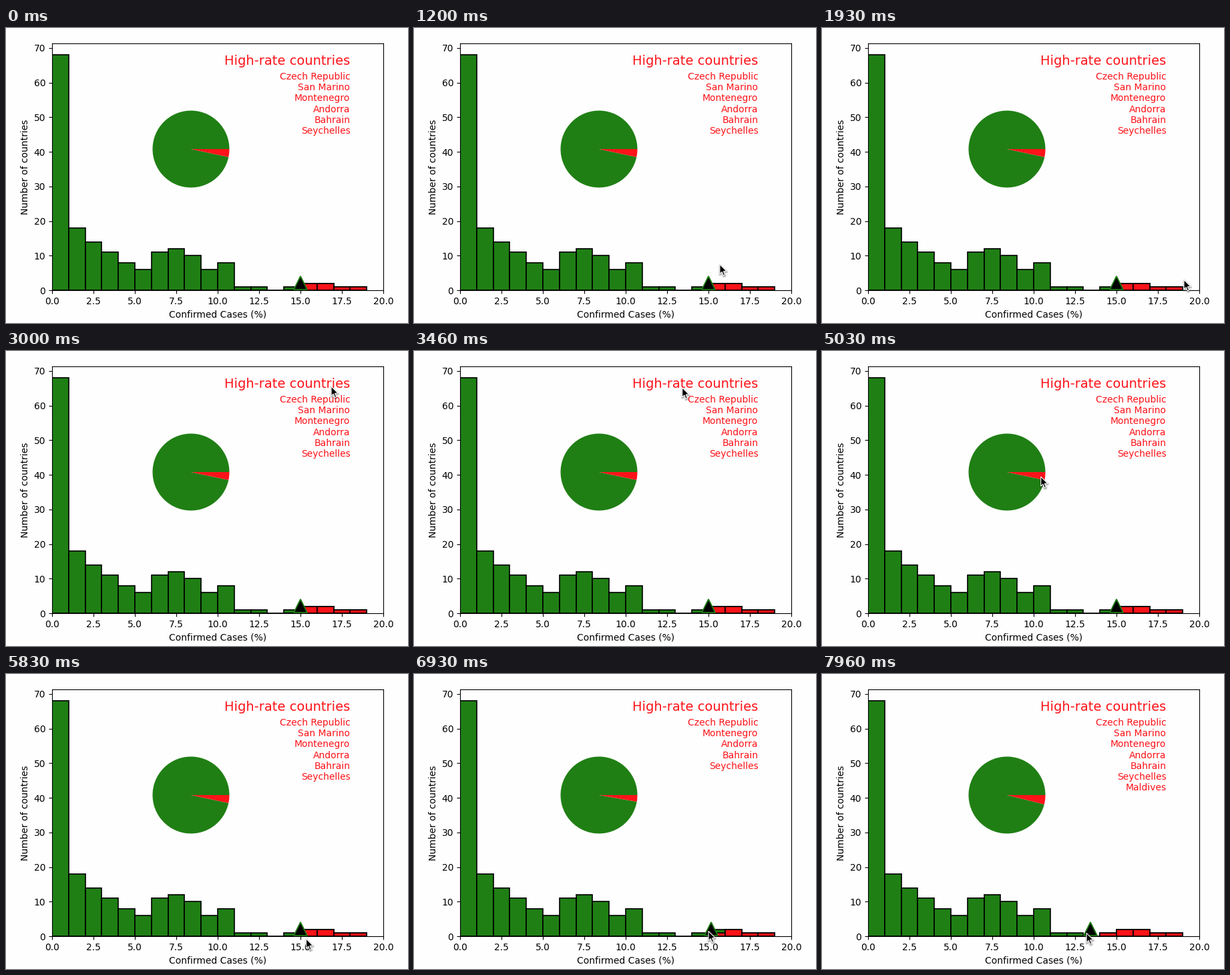
A matplotlib script for the animation above (8000 ms loop, 602 px wide and 441 px high).

```python
import numpy as np
import matplotlib.pyplot as plt
from matplotlib.animation import FuncAnimation
from matplotlib.patches import Polygon, Wedge

W, H, DPI = 602, 441, 100
LOOP, STEP = 8000, 32
PAPER, GREEN, RED = "#fefefe", "#1f7f14", "#fd1319"
LEFT, RIGHT, TOP, BOTTOM = 69, 565, 22.6, 392.2
UNIT = (RIGHT - LEFT) / 20

LOW_COUNTS = [68, 18, 14, 11, 8, 6, 11, 12, 10, 6, 8, 1, 1, 0]
RATES = {
    "Czech Republic": 15.6, "San Marino": 15.08, "Montenegro": 16.3,
    "Andorra": 18.2, "Bahrain": 16.7, "Seychelles": 17.4, "Maldives": 14.4,
}
HIGH_BINS = np.arange(len(LOW_COUNTS), 20)

# Pointer strokes: start ms, end ms, then Bezier points after the last position.
ENTRY = (522, 442)
STROKES = [
    (730, 1530, (540, 290), (386, 357), (466, 407)),
    (1560, 1930, (505, 411), (542, 376)),
    (2330, 3130, (542, 250), (534, 54), (450, 23)),
    (3160, 3930, (395, 30), (375, 95), (409, 132)),
    (4000, 4760, (380, 155), (290, 190), (329, 186)),
    (5030, 5660, (300, 215), (410, 375), (450, 396)),
    (5830, 6000, (442, 388)),
    (6260, 6400, (442, 385)),
    (6830, 6920, (441, 384)),
    (7100, 7130, (437.5, 385)),
    (7300, 8000, (393, 387)),
]
PRESS, LAG, GRIP = 6830, 40, 3.7


def bezier(points, u):
    p = np.array(points, float)
    while len(p) > 1:
        p = p[:-1] + (p[1:] - p[:-1]) * u
    return p[0]


def pointer(t):
    pos = ENTRY
    for start, end, *points in STROKES:
        if t < start:
            break
        pos = bezier([pos, *points], min((t - start) / (end - start), 1))
    return pos


def threshold(t):
    if t < PRESS:
        return 15.0
    x = pointer(max(t - LAG, PRESS))[0] + GRIP
    return (x - LEFT) / UNIT


def count(rates):
    return np.array([sum(int(r) == b for r in rates) for b in HIGH_BINS])


fig = plt.figure(figsize=(W / DPI, H / DPI), dpi=DPI, facecolor=PAPER)
ax = fig.add_axes([LEFT / W, 1 - BOTTOM / H, (RIGHT - LEFT) / W, (BOTTOM - TOP) / H],
                  facecolor=PAPER)
ax.set_xlim(0, 20)
ax.set_ylim(0, 1.05 * max(LOW_COUNTS))
ax.set_xticks(np.arange(0, 20.1, 2.5))
ax.set_xlabel("Confirmed Cases (%)")
ax.set_ylabel("Number of countries")

counts = np.append(LOW_COUNTS, count(RATES.values()))
bar_style = dict(width=1, align="edge", edgecolor="black", linewidth=1.2)
ax.bar(range(19), counts[:19], color=GREEN, **bar_style)
high_bars = ax.bar(HIGH_BINS[:-1], 0, color=RED, **bar_style)
ax.text(18, 65.2, "High-rate countries", color=RED, fontsize=14, ha="right")
names = ax.text(18, 63, "", color=RED, fontsize=10, ha="right", va="top")
handle, = ax.plot([15], [2.1], "^", ms=15, mfc="black", mec=GREEN, mew=1.3)

# Overlay in stage pixels, y pointing down
top = fig.add_axes([0, 0, 1, 1])
top.set_xlim(0, W)
top.set_ylim(H, 0)
top.axis("off")
low_slice = top.add_patch(Wedge((277, 181), 57.5, 12, 360, fc=GREEN, lw=0))
high_slice = top.add_patch(Wedge((277, 181), 57.5, 0, 12, fc=RED, lw=0))

ARROW = np.array([(0, 0.4), (0, 14.6), (3.2, 11.6), (5.5, 17),
                  (7.8, 16), (5.5, 10.8), (10, 10.4)])
shadows = [top.add_patch(Polygon(ARROW, fc="black", ec="black", lw=lw, alpha=0.09,
                                 joinstyle="round")) for lw in (1.2, 2.2, 3.2)]
arrow = top.add_patch(Polygon(ARROW, fc="black", ec="white", lw=0.8))


def draw(i):
    t = i * STEP + STEP / 2
    limit = threshold(t)
    high = {n: r for n, r in RATES.items() if r > limit}
    names.set_text("\n".join(high))
    for bar, n in zip(high_bars, count(high.values())):
        bar.set_height(n)
    handle.set_xdata([limit])

    angle = 360 * len(high) / sum(counts)
    low_slice.set_theta1(angle)
    high_slice.set_theta2(angle)

    tip = pointer(t)
    for part in (arrow, *shadows):
        part.set_visible(t >= STROKES[0][0])
    arrow.set_xy(ARROW + tip)
    for s in shadows:
        s.set_xy(ARROW + tip + (0.3, 1.3))
    return []


anim = FuncAnimation(fig, draw, frames=LOOP // STEP, interval=STEP,
                     repeat=True, repeat_delay=0, blit=False)
plt.show()
```
